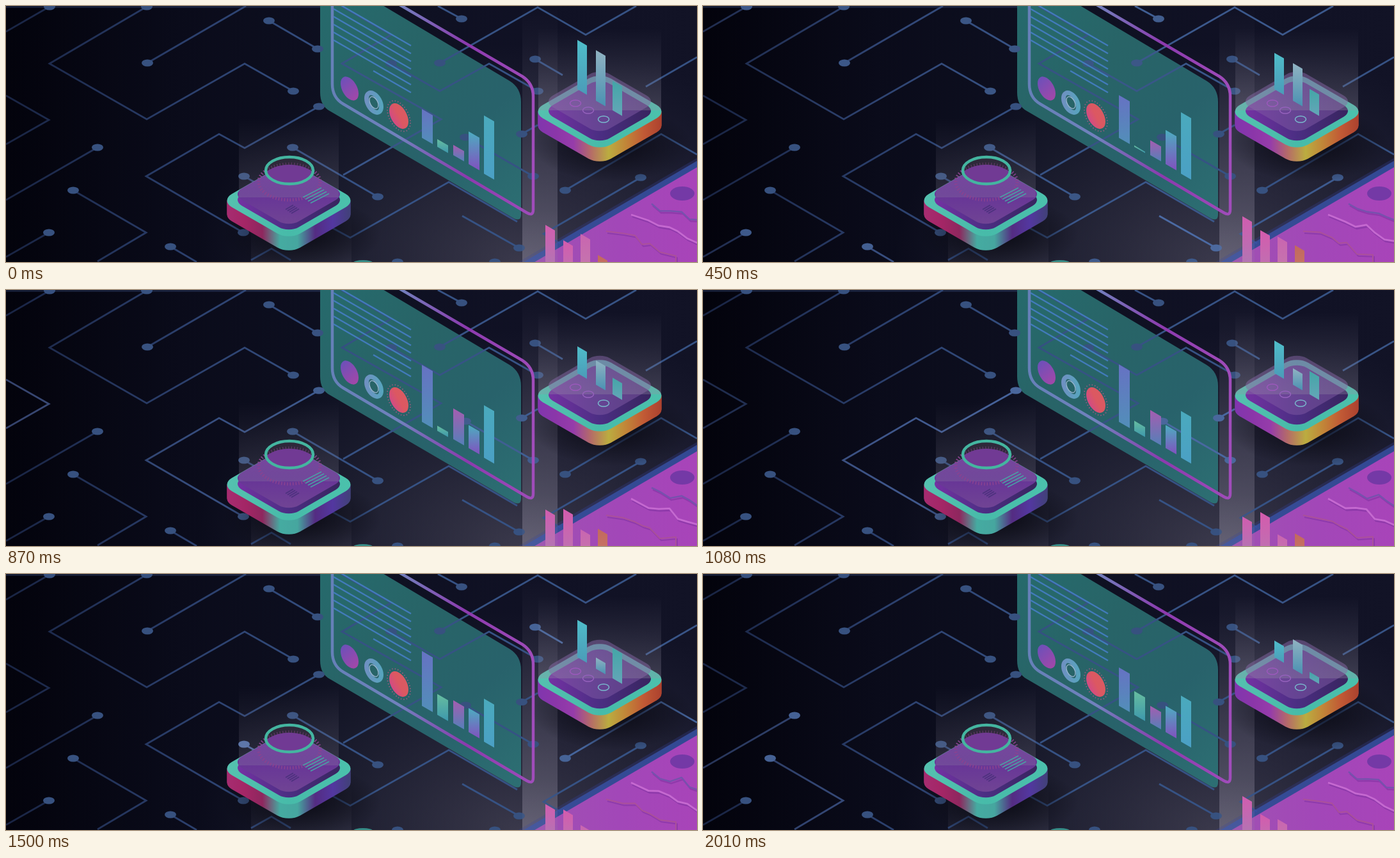
Animation of 1080x400 px, one loop 2040 ms. Source, as an HTML page with a canvas:

```html
<!DOCTYPE html>
<html lang="en">
<head>
<meta charset="utf-8">
<title>Isometric dashboard</title>
<style>
html, body { margin: 0; width: 100%; height: 100%; overflow: hidden; background: #080916; }
canvas { display: block; width: 100vw; height: 100vh; }
</style>
</head>
<body>
<canvas id="stage" width="1080" height="400"></canvas>
<script>
const ctx = document.getElementById('stage').getContext('2d');
const LOOP = 2040, STEP = 30, SLOPE = 0.577;
const KEY_TIMES = [0, 270, 600, 870, 1320, 1710, 2010];

// Circuit traces: points, which ends carry a dot (s, e), time of the light pulse.
const traces = [
  ['68,1 0,40', 's', 600], ['220,1 68,90 220,177 373,90 449,133', 'se', 630],
  ['0,140 67,178 0,216', '', 900], ['143,221 0,303', 's', 1900],
  ['105,288 219,354 143,399', 's', 1900], ['67,354 0,392', 's', 300],
  ['411,23 487,67', 'se', 630], ['221,89 375,0', 's', 620],
  ['489,157 373,222 333,200 219,266 371,354', 'se', 1000],
  ['448,221 581,298', 'se', 270], ['372,266 420,293', 's', 1500],
  ['257,376 298,400', 's', 330], ['383,397 415,379 445,397', '', 1700],
  ['527,264 680,177 525,90 602,45 524,0', '', 200],
  ['602,90 678,133 755,90 831,133', 'se', 640],
  ['678,89 831,2 906,45 985,0', 's', 620], ['712,20 675,0', 's', 580],
  ['718,205 824,266', 'se', 1000], ['806,200 831,186', 's', 1000],
  ['827,83 870,108', 's', 1400], ['1080,80 1000,126', '', 1300],
  ['874,288 1024,200 1080,232', 's', 1400], ['992,268 840,356 866,371', 's', 600],
  ['713,328 802,378', 'e', 520], ['492,337 538,362 692,275 799,337', '', 270],
  ['612,400 614,401', 's', 300], ['764,400 766,401', 's', 300]
].map(([points, dots, pulse]) => ({
  points: points.split(' ').map(p => p.split(',').map(Number)), dots, pulse
}));

// Bars: left x, width, bottom-left y, top colour, bottom colour, top at each key time.
const panelBars = [
  [650, 17, 206, '#6672c3', '#528fb9', [161, 150, 130, 117, 116, 130, 146]],
  [674, 17, 220, '#67bd9f', '#3d98ad', [208, 219, 216, 212, 194, 183, 183]],
  [699, 17, 233, '#a55db0', '#5580b8', [217, 217, 200, 185, 193, 202, 206]],
  [723, 17, 247, '#4cadc0', '#8151bf', [196, 188, 201, 211, 211, 207, 206]],
  [747, 16, 262, '#4aaabd', '#4ba0c5', [171, 165, 168, 180, 195, 194, 190]]
];
const platformBars = [
  [893, 15, 130, '#4fbdc9', '#4b9bb8', [53, 56, 86, 88, 68, 81, 104]],
  [922, 15, 148, '#91b3c2', '#4a91b2', [69, 72, 104, 110, 133, 124, 102]],
  [948, 15, 163, '#43a6a7', '#65a6b8', [117, 118, 138, 137, 115, 117, 153]]
];
const sheetBars = [
  [843, 15, 420, '#d15daf', '#a77eb5', [342, 330, 328, 343, 361, 356, 347]],
  [871, 15, 430, '#d45bad', '#b47bb4', [366, 358, 345, 342, 358, 376, 375]],
  [898, 15, 440, '#c965b0', '#c282ac', [356, 356, 366, 374, 389, 394, 383]],
  [925, 15, 450, '#c2695e', '#ce8270', [389, 380, 371, 373, 392, 405, 402]]
];

// Cubic interpolation through the keys, flat at extremes.
function keyed(values, t) {
  const last = KEY_TIMES.length - 1;
  const slope = k => (values[k + 1] - values[k]) / (KEY_TIMES[k + 1] - KEY_TIMES[k]);
  const tangent = k => {
    if (k === 0) return slope(0);
    if (k === last) return slope(last - 1);
    const a = slope(k - 1), b = slope(k);
    return a * b > 0 ? 2 * a * b / (a + b) : 0;
  };
  let i = 0;
  while (i < last - 1 && t >= KEY_TIMES[i + 1]) i++;
  const span = KEY_TIMES[i + 1] - KEY_TIMES[i];
  const u = Math.min(1, (t - KEY_TIMES[i]) / span), v = 1 - u;
  return values[i] * v * v * (1 + 2 * u) + values[i + 1] * u * u * (3 - 2 * u)
    + span * u * v * (tangent(i) * v - tangent(i + 1) * u);
}

function gradient(x0, y0, x1, y1, ...colors) {
  const g = ctx.createLinearGradient(x0, y0, x1, y1);
  colors.forEach((c, i) => g.addColorStop(i / (colors.length - 1), c));
  return g;
}

function fill(path, style) { ctx.fillStyle = style; ctx.fill(path); }

function stroke(path, style, width) {
  ctx.strokeStyle = style;
  ctx.lineWidth = width;
  ctx.stroke(path);
}

function polyline(points) {
  const path = new Path2D();
  points.forEach(([x, y]) => path.lineTo(x, y));
  return path;
}

function ellipse(x, y, rx, ry) {
  const path = new Path2D();
  path.ellipse(x, y, rx, ry, 0, 0, 2 * Math.PI);
  return path;
}

function glow(x, y, rx, ry, inner, outer) {
  ctx.save();
  ctx.translate(x, y);
  ctx.scale(rx, ry);
  const g = ctx.createRadialGradient(0, 0, 0, 0, 0, 1);
  g.addColorStop(0, inner);
  g.addColorStop(1, outer);
  fill(ellipse(0, 0, 1, 1), g);
  ctx.restore();
}

// Rounded square lying on the floor.
function plate(x, y, halfWidth, radius) {
  const side = Math.SQRT2 * (halfWidth + 0.414 * radius);
  const square = new Path2D(), path = new Path2D();
  square.roundRect(-side / 2, -side / 2, side, side, radius);
  path.addPath(square, new DOMMatrix().translate(x, y).scale(1, SLOPE).rotate(45));
  return path;
}

// Circle on the upright panel.
function panelCircle(x, y, r) {
  const path = new Path2D();
  path.addPath(ellipse(0, 0, r, r), new DOMMatrix([1, SLOPE, 0, 1.2, x, y]));
  return path;
}

function beam(x, y, w, h, alpha) {
  ctx.fillStyle = gradient(0, y, 0, y + h, 'rgba(150,145,165,0)', `rgba(150,145,165,${alpha})`);
  ctx.fillRect(x, y, w, h);
}

function drawBars(bars, t) {
  for (const [x, w, bottom, c0, c1, tops] of bars) {
    const top = keyed(tops, t), skew = w * 0.58;
    const shape = polyline([[x, top], [x + w, top + skew], [x + w, bottom + skew], [x, bottom]]);
    fill(shape, gradient(0, top, 0, bottom + skew, c0, c1));
  }
}

function drawBackground() {
  ctx.fillStyle = gradient(0, 0, 1080, 0, '#03030c', '#0a0b1a', '#0e1021', '#101124', '#121326');
  ctx.fillRect(0, 0, 1080, 400);
  glow(800, 400, 500, 340, 'rgba(72,70,88,.75)', 'rgba(50,50,70,0)');
  ctx.fillStyle = 'rgba(48,66,110,.4)';
  ctx.fillRect(0, 0, 580, 3);
  beam(807, 0, 55, 400, 0.38);
  beam(383, 330, 157, 70, 0.1);
}

function drawTraces(t) {
  ctx.lineJoin = 'miter';
  for (const { points, dots, pulse } of traces) {
    const light = Math.exp(-(((t - pulse) / 130) ** 2));
    const tone = (r, g, b) =>
      `rgb(${r + 28 * light},${g + 32 * light},${b + 42 * light})`;
    const shade = gradient(0, 0, 560, 0, tone(25, 36, 67), tone(43, 63, 108), tone(54, 82, 132));
    stroke(polyline(points), shade, 2.8);
    const dotColor = tone(55, 81, 127);
    if (dots.includes('s')) fill(ellipse(...points[0], 9, 5.5), dotColor);
    if (dots.includes('e')) fill(ellipse(...points.at(-1), 9, 5.5), dotColor);
  }
}

function drawPanel(t) {
  const frame = new Path2D('M510-5V122Q510 143 527 153L814 323Q824 329 824 318V141Q824 121 807 110L610-5');
  stroke(frame, gradient(510, 0, 824, 0, '#6680b8', '#7181bd', '#8c3aae', '#a04cba'), 4.5);

  for (let i = 0; i < 7; i++) {
    const endY = 62 + 12.2 * i, startX = i === 6 ? 574 : 512;
    stroke(polyline([[startX, endY - (633 - startX) * SLOPE], [633, endY]]), '#427bbb', 2.3);
  }

  fill(panelCircle(537, 129, 14), gradient(523, 115, 551, 145, '#6d50b9', '#a447a8'));
  stroke(panelCircle(575, 151, 11.5), gradient(560, 0, 590, 0, '#718fc2', '#55a5bd'), 7);
  stroke(panelCircle(575, 151, 7), '#9ab5d0', 1.3);
  fill(panelCircle(614, 172, 15), gradient(600, 180, 630, 165, '#cf478f', '#dc5861', '#d95b62'));
  ctx.setLineDash([1.5, 3]);
  stroke(panelCircle(614, 172, 18), '#965c7f', 1.8);
  ctx.setLineDash([]);

  drawBars(panelBars, t);
}

function drawPanelGlass() {
  const glass = new Path2D('M491-5V135Q491 156 506 164L794 332Q805 337 805 326V150Q805 128 787 117L582-5Z');
  fill(glass, gradient(491, 0, 805, 330, '#266a6c', '#286467', '#28626b', '#2d6f73'));
}

function drawBase(x, y, sideColors) {
  glow(x + 20, y + 52, 125, 58, 'rgba(8,8,16,.85)', 'rgba(8,8,16,0)');
  const side = gradient(x - 96, 0, x + 96, 0, ...sideColors);
  for (let depth = 22; depth > 0; depth--) fill(plate(x, y + depth, 96.5, 25), side);
  fill(plate(x, y, 96.5, 25), gradient(x - 96, 0, x + 96, 0, '#55c1af', '#47bba9', '#4bc1ac'));
  fill(plate(x, y - 1, 80, 22), gradient(x - 80, 0, x + 80, 0, '#7432a3', '#4b2e83', '#38255f'));
}

function drawLeftPlatform() {
  const x = 442, y = 304;
  drawBase(x, y, ['#a62c70', '#a42666', '#8e275e', '#45aba1', '#46a69f', '#542c82', '#5337a0', '#414179']);
  fill(plate(x, y - 10, 80, 22), gradient(0, 247, 0, 341, '#743a9e', '#673597', '#704494'));
  beam(364, 175, 156, 124, 0.22);

  ctx.setLineDash([1.5, 3]);
  stroke(ellipse(443, 275, 48, 28), '#8b4290', 5);
  ctx.setLineDash([]);
  fill(ellipse(443, 257, 36, 20), 'rgba(55,45,64,.6)');
  ctx.save();
  ctx.clip(ellipse(443, 257, 36, 20));
  fill(ellipse(443, 275, 45, 27), '#713a94');
  ctx.restore();
  stroke(ellipse(443, 257, 37, 21), '#44b5a0', 4.5);

  for (let i = 0; i < 4; i++) {
    const lx = 464 + i * 4, ly = 299 + i * 3;
    stroke(polyline([[lx, ly], [lx + 29, ly - 15]]), '#4b9da6', 1.7);
    stroke(polyline([[437 + i * 3, 318 + i * 2], [449 + i * 3, 311 + i * 2]]), '#4d327e', 1.7);
  }
}

function drawRightPlatform(t) {
  const x = 928, y = 165;
  drawBase(x, y, ['#8136ae', '#8b36a9', '#963caa', '#b56c67', '#bbac40', '#c18538', '#c15a35', '#ad422f']);
  fill(plate(x, y - 16, 80, 22), 'rgba(128,91,163,.5)');
  beam(832, 35, 192, 128, 0.3);
  [[890, 152, '#9d59bd'], [910, 163, '#9662bd'], [934, 177, '#79b9cd']]
    .forEach(([cx, cy, color]) => stroke(ellipse(cx, cy, 8.5, 5), color, 1.5));
  drawBars(platformBars, t);
}

// Chart line whose inner points drift up and down over time.
function wavyLine(points, t, color, width, swing, phase) {
  const moved = points.map(([x, y], i) => [
    x, y + (i ? swing * Math.sin(i * 2.1 + phase + 2 * Math.PI * t / LOOP) : 0)
  ]);
  const path = polyline(moved);
  ctx.save();
  ctx.translate(2, 3);
  stroke(path, 'rgba(110,40,150,.4)', width);
  ctx.restore();
  stroke(path, color, width);
}

function drawSheet(t) {
  ctx.lineJoin = 'round';
  const edge = polyline([[800, 411], [1090, 242]]);
  stroke(edge, 'rgba(55,65,145,.3)', 18);
  stroke(edge, 'rgba(56,82,165,.8)', 10);
  fill(polyline([[816, 406], [1080, 252], [1080, 400], [816, 400]]),
    gradient(840, 0, 1080, 0, '#a050b3', '#a247b8', '#a844b9'));
  fill(ellipse(1057, 293, 19, 11), '#7439a6');
  wavyLine([[1009, 309], [1022, 318], [1038, 323], [1056, 321], [1068, 331], [1084, 337]],
    t, '#7751ad', 2.5, 3, 0.2);
  wavyLine([[977, 326], [1004, 338], [1020, 342], [1037, 344], [1050, 355], [1065, 362], [1084, 370]],
    t, '#c569d0', 2.8, 3, 2.5);
  wavyLine([[938, 352], [964, 356], [983, 360], [994, 370], [1006, 372], [1022, 386], [1047, 388], [1047, 404]],
    t, '#aa509a', 2, 2.5, 1.4);
  beam(807, 320, 55, 80, 0.12);
  drawBars(sheetBars, t);
}

function render(t) {
  drawBackground();
  drawPanelGlass();
  drawTraces(t);
  drawPanel(t);
  drawLeftPlatform();
  drawRightPlatform(t);
  fill(ellipse(558, 401, 15, 4), '#358b86');
  drawSheet(t);
}

let start;
function tick(now) {
  start ??= now;
  render(Math.floor((now - start) % LOOP / STEP) * STEP);
  requestAnimationFrame(tick);
}
requestAnimationFrame(tick);
</script>
</body>
</html>
```
